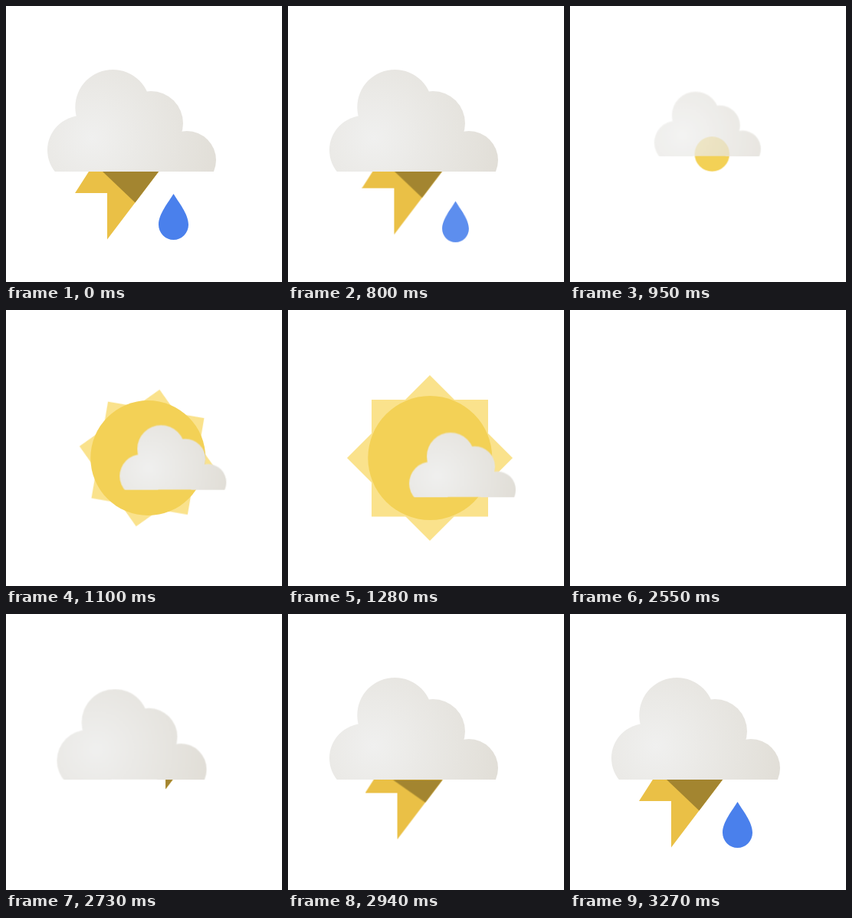
An HTML page for the animation above (3.3 s loop, 360x360 px).

```html
<!DOCTYPE html>
<html lang="en">
<head>
<meta charset="utf-8">
<title>Storm to sun</title>
<style>
  html, body { margin: 0; width: 100%; height: 100%; overflow: hidden; background: #fff; }
  svg { display: block; width: 100%; height: 100%; }

  :root { --out: cubic-bezier(.3333, 1, .6667, 1); }
  .a { animation: 3.3s linear infinite; }

  .storm { animation-name: storm; animation-timing-function: step-end; }
  .sun { animation-name: sun; animation-timing-function: step-end; }
  .cloud { animation-name: cloud; transform-origin: 164px 216px; }
  .bolt { animation-name: bolt; }
  .bolt-shade { animation-name: bolt-shade; transform-origin: 0 216px; }
  .drop { animation-name: drop; transform-origin: 218.5px 275px; }
  .disc { animation-name: disc; transform-origin: 185.3px 193px; }
  .rays { animation-name: rays; transform-origin: 185px 193px; }
  .tint { animation-name: tint; }
  .sun-shade { animation-name: sun-shade; transform-origin: 0 244px; }
  .puff { animation-name: puff; }

  /* scene cuts */
  @keyframes storm { 0% { opacity: 1 } 26.96% { opacity: 0 } 77.27%, 100% { opacity: 1 } }
  @keyframes sun { 0% { opacity: 0 } 26.96% { opacity: 1 } 77.27%, 100% { opacity: 0 } }

  /* storm */
  @keyframes cloud {
    0%, 77.26% { transform: scale(1) }
    77.27% { transform: scale(0); animation-timing-function: var(--out) }
    86.36%, 100% { transform: scale(1) }
  }
  @keyframes bolt {
    0%, 24.2% { transform: translate(0, 0) }
    24.24% { transform: translate(6px, -6px) }
    26.06%, 26.97% { transform: translate(30px, -30px) }
    27%, 80.91% { transform: translate(90px, -90px); animation-timing-function: var(--out) }
    94.67%, 100% { transform: translate(0, 0) }
  }
  @keyframes bolt-shade {
    0%, 27% { transform: translateY(0) scaleY(1) }
    27.1%, 80.91% { transform: translateY(90px) scaleY(-1.25); animation-timing-function: var(--out) }
    94.67%, 100% { transform: translateY(0) scaleY(1) }
  }
  @keyframes drop {
    0%, 24.2% { transform: translateY(0) scale(1); opacity: 1 }
    24.24% { transform: translateY(6px) scale(.9); opacity: .9 }
    26.06%, 26.97% { transform: translateY(30px) scale(.5); opacity: .5 }
    27%, 90% { transform: translateY(-60px) scale(0); opacity: 0; animation-timing-function: var(--out) }
    99.09%, 100% { transform: translateY(0) scale(1); opacity: 1 }
  }

  /* sun */
  @keyframes disc {
    0%, 26.97% { transform: scale(0); animation-timing-function: var(--out) }
    36.52%, 100% { transform: scale(1) }
  }
  @keyframes rays {
    0%, 26.97% { transform: rotate(60deg) scale(0); animation-timing-function: var(--out) }
    38.85%, 100% { transform: rotate(0deg) scale(1) }
  }
  @keyframes puff {
    0%, 26.97% { transform: translate(-60px, -60px); opacity: 0; animation-timing-function: var(--out) }
    31% { opacity: 1 }
    38.85%, 100% { transform: translate(0, 0); opacity: 1 }
  }
  @keyframes tint {
    0%, 38.85% { opacity: 0 }
    46.97%, 100% { opacity: 1 }
  }
  @keyframes sun-shade {
    0%, 39.7% { transform: scaleY(0); animation-timing-function: var(--out) }
    46.97%, 100% { transform: scaleY(1) }
  }
</style>
</head>
<body>
<svg viewBox="0 0 360 360">
  <defs>
    <radialGradient id="grey" gradientUnits="userSpaceOnUse" cx="112" cy="172" r="168">
      <stop offset="0" stop-color="#f0f0ef"/>
      <stop offset="1" stop-color="#e1ded7"/>
    </radialGradient>
    <linearGradient id="square-tint" gradientUnits="userSpaceOnUse" x1="109" y1="117" x2="261" y2="269">
      <stop offset="0" stop-color="#fad674"/>
      <stop offset="1" stop-color="#a77b12"/>
    </linearGradient>
    <linearGradient id="diamond-tint" gradientUnits="userSpaceOnUse" x1="131" y1="139" x2="239" y2="247">
      <stop offset=".5" stop-color="#f7b70f"/>
      <stop offset=".5" stop-color="#c59208"/>
    </linearGradient>

    <clipPath id="above"><rect width="360" height="216"/></clipPath>
    <clipPath id="below"><rect y="216" width="360" height="144"/></clipPath>

    <g id="cloud" clip-path="url(#above)" fill="url(#grey)">
      <circle cx="99" cy="188" r="45"/>
      <circle cx="139.3" cy="132" r="49"/>
      <circle cx="189" cy="153" r="42"/>
      <circle cx="236" cy="201" r="38"/>
      <rect x="99" y="150" width="129" height="66"/>
    </g>

    <path id="bolt" d="M172 116H275L132 304.5V244H90Z"/>
    <clipPath id="in-bolt"><use href="#bolt"/></clipPath>

    <rect id="square" x="109" y="117" width="152" height="152.5"/>
    <path id="diamond" d="M185 85L293 193L185 301L77 193Z"/>
    <circle id="disc" cx="185.3" cy="193" r="81"/>
    <clipPath id="in-sun">
      <use href="#square"/><use href="#diamond"/><use href="#disc"/>
    </clipPath>
  </defs>

  <g class="a storm">
    <g clip-path="url(#below)">
      <g class="a bolt">
        <use href="#bolt" fill="#eac046"/>
        <g clip-path="url(#in-bolt)">
          <path class="a bolt-shade" d="M105 196H330V316H231Z" fill="#a38530"/>
        </g>
      </g>
    </g>
    <path class="a drop" fill="#4a80ec"
      d="M218.5 245C212 256 199 271 199 285.2A19.5 19.8 0 0 0 238 285.2C238 271 225 256 218.5 245Z"/>
    <use class="a cloud" href="#cloud"/>
  </g>

  <g class="a sun">
    <g class="a rays">
      <g fill="#fae28c"><use href="#diamond"/><use href="#square"/></g>
      <g class="a tint">
        <use href="#diamond" fill="url(#diamond-tint)"/>
        <use href="#square" fill="url(#square-tint)"/>
      </g>
    </g>
    <use class="a disc" href="#disc" fill="#f3d156"/>
    <g clip-path="url(#in-sun)">
      <path class="a sun-shade" d="M163 244H330V320H239Z" fill-opacity=".31"/>
    </g>
    <g class="a puff">
      <use href="#cloud" transform="translate(123.9 107.5) scale(.632)"/>
    </g>
  </g>
</svg>
</body>
</html>
```
